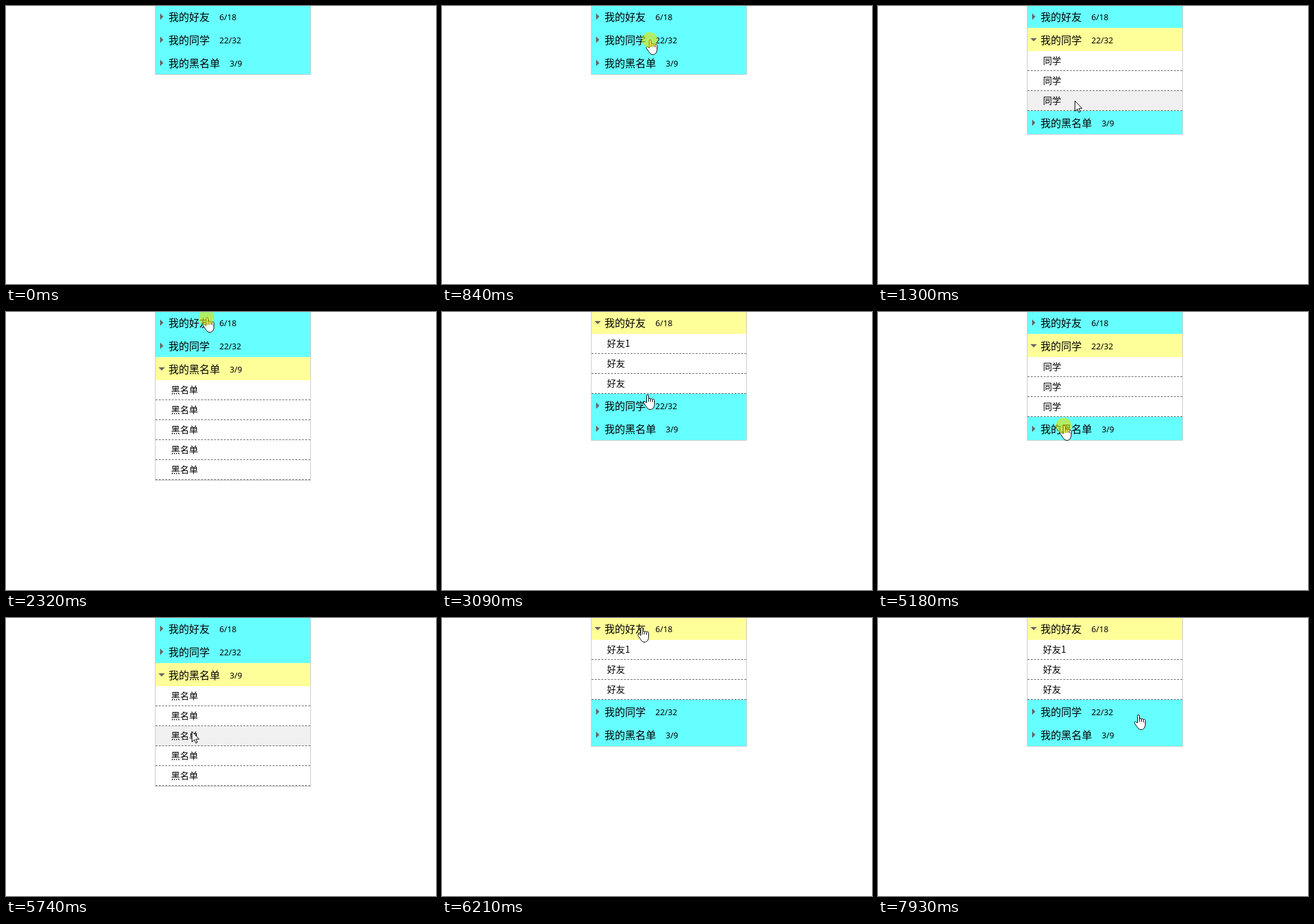
Write an HTML page with a canvas that moves like this. It is 667 by 432 pixels and loops after 8 s.

```html
<!DOCTYPE html>
<html lang="zh">
<head>
<meta charset="utf-8">
<style>
  html, body { margin: 0; height: 100%; overflow: hidden; background: #fff; }
  canvas { display: block; }
</style>
</head>
<body>
<canvas id="stage" width="667" height="432"></canvas>
<script>
const ctx = document.getElementById('stage').getContext('2d', { alpha: false });
const LOOP = 8000;
const LEFT = 232, WIDTH = 240, HEADER = 36, ITEM = 31;
const TITLE_X = 252, TITLE_SIZE = 16;
const CJK = '"Noto Sans CJK SC", "Noto Sans CJK JP", "Noto Sans CJK", sans-serif';

// The pointer jumps in steps; every trip takes the same time.
const STEP = 77, STEPS = 4;
// A click follows the start of a trip, its group opens when the button is released.
const PRESS_DELAY = 308, PRESS_TIME = 140;

const groups = [
  { title: '我的好友', count: '6/18', items: ['好友1', '好友', '好友'] },
  { title: '我的同学', count: '22/32', items: Array(3).fill('同学') },
  { title: '我的黑名单', count: '3/9', items: Array(5).fill('黑名单') },
];

const trip = (start, x, y) => ({ start, x, y });
const click = (start, x, y, group) => ({ start, x, y, group, press: start + PRESS_DELAY });
const offstage = { x: 688, y: 574 };
const trips = [
  trip(210, 432, 112),
  click(530, 322, 52, 1),
  trip(1000, 305, 147),
  click(1390, 308, 179, 2),
  click(2012, 311, 8, 0),
  trip(2460, 505, 56),
  click(2872, 306, 133, 1),
  click(3872, 303, 43, 1),
  click(4872, 288, 176, 2),
  click(5762, 309, 14, 0),
  trip(6290, 594, 181),
  trip(6820, 520, 440),
  trip(7610, 403, 150),
];

const arrow = new Path2D('M.5.5V16.5L4.2 13 6.5 18.3 8.8 17.3 6.6 12.2H11.5Z');
const hand = new Path2D('M5.5 13V2.3a1.5 1.8 0 0 1 3 0V7.5a1.5 1.5 0 0 1 3 .3 ' +
  '1.5 1.5 0 0 1 3 .8 1.5 1.5 0 0 1 3 .9V15.5C17.5 20 15 23.5 11 23.5 ' +
  '7.5 23.5 6 21 4.5 18.5L1 13.5C0 11.5 2.5 10.5 4 12Z');
const knuckles = new Path2D('M8.5 7.5V11.5M11.5 8V11.5M14.5 9V12');

const easeOut = k => 1 - (1 - k) ** 2;

function stateAt(t) {
  let { x, y } = offstage, open = -1, pressed = false;
  for (const stop of trips) {
    if (t < stop.start) break;
    const step = Math.min(STEPS, Math.floor((t - stop.start) / STEP) + 1);
    const p = easeOut(step / STEPS);
    x += (stop.x - x) * p;
    y += (stop.y - y) * p;
    const held = t - stop.press;
    pressed = held >= 0 && held < PRESS_TIME;
    if (held >= PRESS_TIME) open = stop.group;
  }
  return { x: Math.round(x), y: Math.round(y), open, pressed };
}

function rect(color, x, y, w, h) {
  ctx.fillStyle = color;
  ctx.fillRect(x, y, w, h);
}

function text(string, font, x, y) {
  ctx.font = font;
  ctx.fillStyle = '#000';
  ctx.fillText(string, x, y);
}

function triangle(...points) {
  ctx.fillStyle = '#666';
  ctx.beginPath();
  for (const [x, y] of points) ctx.lineTo(x, y);
  ctx.fill();
}

function dashedLine(y) {
  const dash = 3, count = WIDTH / 5;
  ctx.strokeStyle = '#666';
  ctx.setLineDash([dash, (WIDTH - dash * count) / (count - 1)]);
  ctx.beginPath();
  ctx.moveTo(LEFT, y);
  ctx.lineTo(LEFT + WIDTH, y);
  ctx.stroke();
  ctx.setLineDash([]);
}

function drawHeader({ title, count }, y, isOpen) {
  rect(isOpen ? '#ff9' : '#6ff', LEFT, y, WIDTH, HEADER);
  if (isOpen) triangle([236.5, y + 16], [246.5, y + 16], [241.5, y + 21]);
  else triangle([239, y + 13.5], [244, y + 18.5], [239, y + 23.5]);
  text(title, `350 ${TITLE_SIZE}px ${CJK}`, TITLE_X, y + 25);
  text(count, '12.7px "Noto Sans", sans-serif', TITLE_X + title.length * TITLE_SIZE + 15, y + 24);
}

function drawItem(label, y, hovered) {
  if (hovered) rect('#f0f0f0', LEFT, y, WIDTH, ITEM);
  text(label, `350 14px ${CJK}`, 256, y + 20);
  dashedLine(y + ITEM - .5);
}

// Draws the list and tells whether the pointer is over a header.
function drawMenu({ x, y: pointerY, open }) {
  const inside = x >= LEFT && x < LEFT + WIDTH;
  const isOver = (top, height) => inside && pointerY >= top && pointerY < top + height;
  let y = -2, overHeader = false;
  groups.forEach((group, i) => {
    drawHeader(group, y, i === open);
    overHeader = overHeader || isOver(y, HEADER);
    y += HEADER;
    if (i !== open) return;
    for (const label of group.items) {
      drawItem(label, y, isOver(y, ITEM));
      y += ITEM;
    }
  });
  rect('#ccc', LEFT - 1, 0, 1, y);
  rect('#ccc', LEFT + WIDTH, 0, 1, y);
  rect('#ccc', LEFT - 1, y, WIDTH + 2, 1);
  return overHeader;
}

function drawPointer({ x, y, pressed }, isHand) {
  const shape = isHand ? hand : arrow;
  ctx.save();
  ctx.translate(isHand ? x - 6 : x, y);
  ctx.fillStyle = '#fff';
  ctx.strokeStyle = '#000';
  ctx.fill(shape);
  ctx.stroke(shape);
  if (isHand) ctx.stroke(knuckles);
  ctx.restore();
  if (!pressed) return;
  ctx.fillStyle = 'rgba(225, 225, 0, .6)';
  ctx.beginPath();
  ctx.arc(x, y + .5, 12, 0, Math.PI * 2);
  ctx.fill();
}

function draw(t) {
  const state = stateAt(t);
  rect('#fff', 0, 0, 667, 432);
  drawPointer(state, drawMenu(state));
}

const begin = performance.now();
function tick() {
  draw((performance.now() - begin) % LOOP);
  requestAnimationFrame(tick);
}
tick();
</script>
</body>
</html>
```
